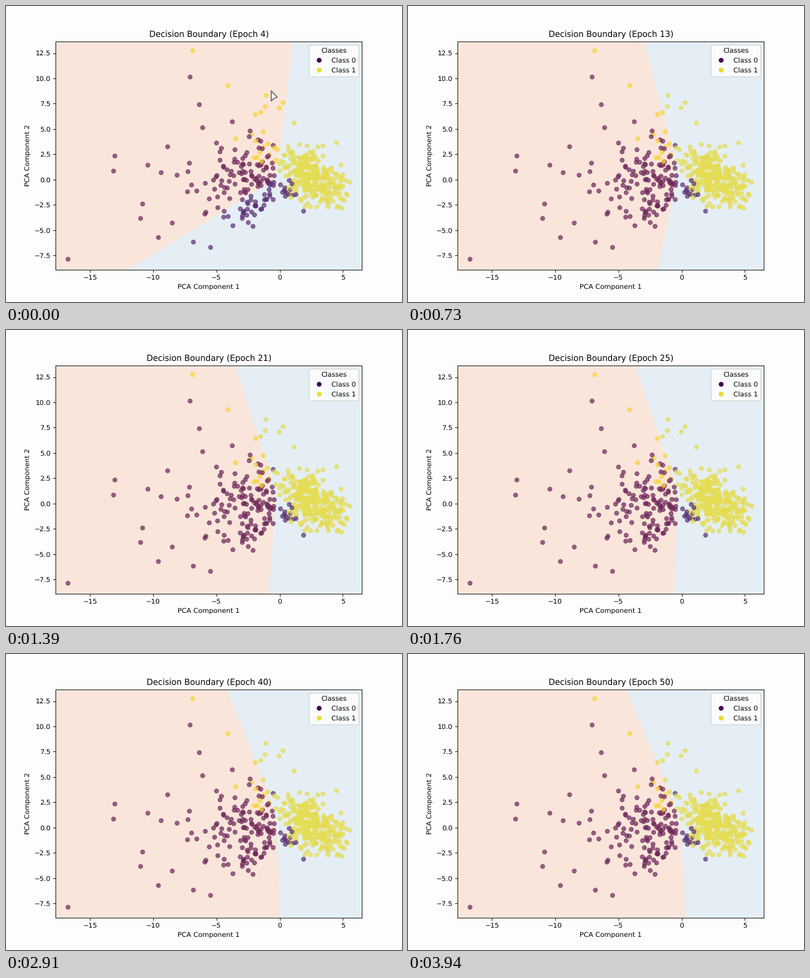
Animation of 600x450 px, one loop 3970 ms. Source, as a matplotlib script:

```python
import numpy as np
import matplotlib.pyplot as plt
from matplotlib.animation import FuncAnimation
from matplotlib.lines import Line2D
from matplotlib.patches import Polygon

LOOP_MS, FRAMES = 3970, 120
FIRST, LAST = 4, 50
FRAMES_PER_EPOCH = 2.427
CURSOR_FRAMES = 6
PURPLE, YELLOW = "#440154", "#fde725"

plt.rcParams.update({"font.family": "DejaVu Sans", "text.hinting": "none"})
rng = np.random.default_rng(7)


def to_data(points):
    """Stage pixels to plot coordinates."""
    p = np.asarray(points, float)
    return np.column_stack([(p[:, 0] - 414.7) / 19.15, (263.8 - p[:, 1]) / 15.38])


def inside(x, y, box, n):
    """First n points within box = (x0, x1, y0, y1)."""
    keep = (x > box[0]) & (x < box[1]) & (y > box[2]) & (y < box[3])
    return np.column_stack([x, y])[keep][:n]


def cloud(n, center, spread, box, slope=0.0):
    dx, dy = rng.normal(0, spread, (4 * n, 2)).T
    return inside(center[0] + dx, center[1] + dy + slope * dx, box, n)


def tail(n, edge, scale, cy, sy, box):
    """Cloud that thins out to the left of edge."""
    x = edge - rng.gamma(1.9, scale, 4 * n)
    return inside(x, rng.normal(cy, sy, 4 * n), box, n)


# The most isolated points of each class, in stage pixels
FAR_0 = [(94, 385), (163, 251), (165, 228), (204, 323), (207, 301), (215, 242),
         (231, 352), (252, 330), (245, 214), (279, 108), (293, 150), (298, 185),
         (284, 359), (310, 367), (343, 176), (370, 190), (451, 312)]
FAR_1 = [(283, 68), (336, 121), (394, 136), (393, 153), (414, 155), (420, 147),
         (386, 162), (378, 165), (390, 191), (348, 202), (372, 195), (437, 178),
         (501, 208), (521, 268)]

class0 = np.vstack([
    FAR_0,
    tail(136, 410, 31, 271, 36, (235, 410, 196, 346)),
    cloud(13, (425, 284), (7, 13), (410, 460, 262, 320)),
])
class1 = np.vstack([
    FAR_1,
    cloud(12, (395, 225), (12, 14), (370, 415, 195, 250)),
    cloud(285, (463, 262), (25, 20), (413, 518, 185, 315), slope=0.4),
])
points = to_data(np.vstack([class0, class1]))
colors = np.array([PURPLE] * len(class0) + [YELLOW] * len(class1))
order = rng.permutation(len(points))

fig, ax = plt.subplots(figsize=(8, 6), dpi=75, facecolor="#fdfdfe")
fig.subplots_adjust(right=0.899)
ax.set_facecolor("white")
ax.scatter(*points[order].T, c=colors[order], s=36, alpha=0.7, zorder=1)
ax.set(xlim=(-17.74, 6.52), ylim=(-8.89, 13.64),
       xticks=np.arange(-15, 6, 5), yticks=np.arange(-7.5, 13, 2.5))
ax.set_xlabel("PCA Component 1", labelpad=4.6)
ax.set_ylabel("PCA Component 2")
title = ax.set_title("", pad=6.6)


def marker(color, label):
    return Line2D([], [], ls="", marker="o", ms=6, color=color, label=label)


ax.legend(handles=[marker(PURPLE, "Class 0"), marker("#e9de32", "Class 1")],
          title="Classes", loc="upper right")


def region(color):
    patch = Polygon([(0, 0), (0, 1), (1, 1)], fc=color, alpha=0.25, lw=0, zorder=2)
    return ax.add_patch(patch)


left, right = region("#eb9b6f"), region("#9bbfdb")
cursor = ax.add_patch(Polygon(
    to_data([(402, 129), (402, 144.5), (405.8, 140.8), (411, 138.5)]),
    fc="white", ec="#3a3a3a", lw=1.1, joinstyle="round", zorder=6))


def boundary(epoch):
    """Bent line: the ends swing quickly at first, then drift."""
    return [
        (348 - 0.41 * epoch + 704 * epoch ** -1.5, 52),
        (400.5 + 250 / epoch ** 2, 220),
        (405 + 0.16 * epoch, 265),
        (400 + 0.49 * epoch - 2500 * epoch ** -1.75, 403),
    ]


def update(i):
    epoch = min(LAST, FIRST + int((i + 0.385) / FRAMES_PER_EPOCH))
    edge = boundary(epoch)
    left.set_xy(to_data(edge + [(70, 403), (70, 52)]))
    right.set_xy(to_data(edge + [(545, 403), (545, 52)]))
    title.set_text(f"Decision Boundary (Epoch {epoch})")
    cursor.set_visible(i < CURSOR_FRAMES)
    return left, right, title, cursor


anim = FuncAnimation(fig, update, frames=FRAMES, interval=LOOP_MS / FRAMES,
                     repeat=True, repeat_delay=0, blit=False)
plt.show()
```
